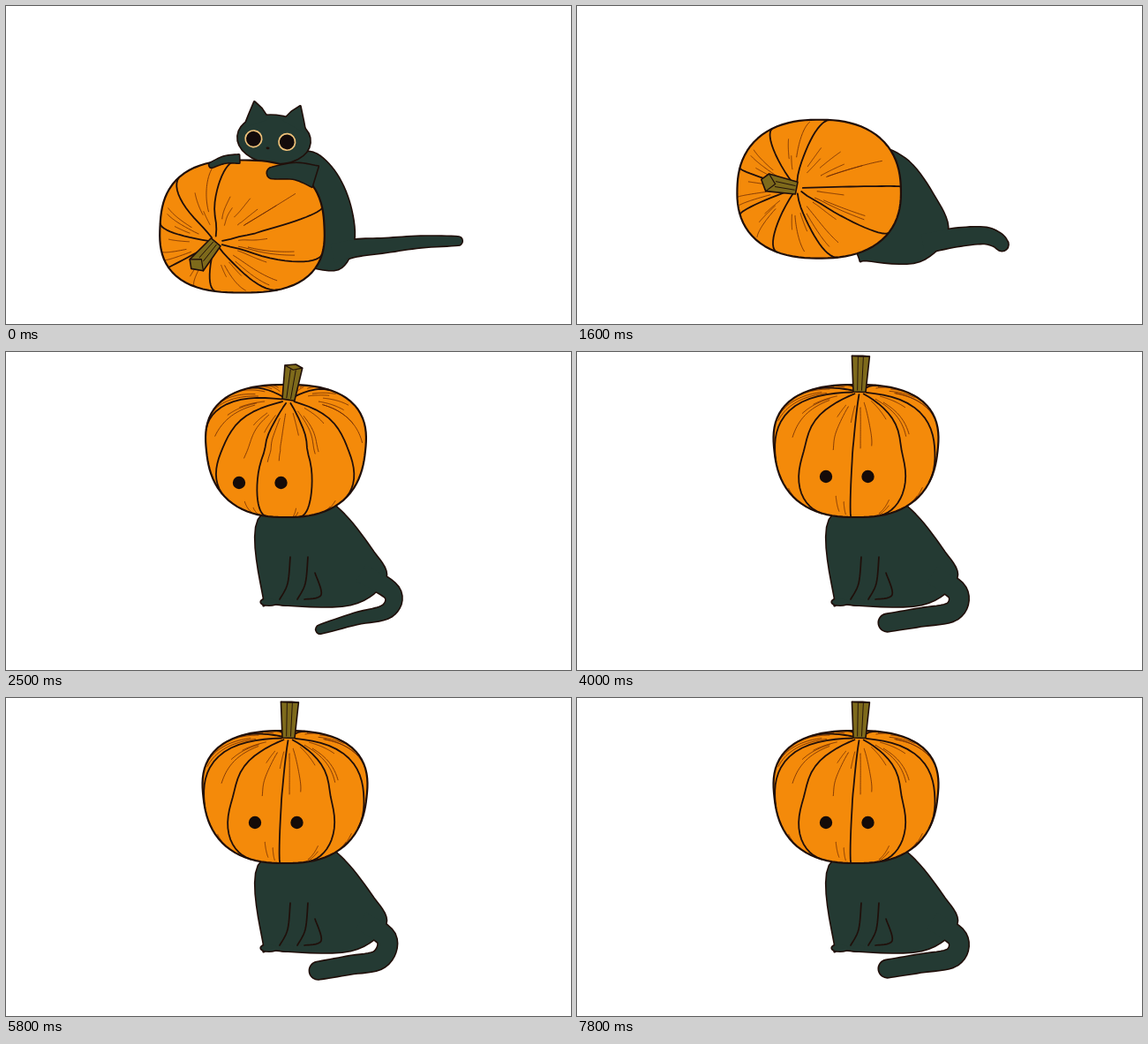
Write an HTML page with a canvas that moves like this. It is 640 px wide and 360 px high and loops after 7900 ms.

```html
<!DOCTYPE html>
<html lang="en">
<head>
<meta charset="utf-8">
<title>Cat and pumpkin</title>
<style>
html, body { margin: 0; width: 100%; height: 100%; overflow: hidden; background: #fff; }
canvas { display: block; width: 640px; height: 360px; }
</style>
</head>
<body>
<canvas id="c" width="640" height="360"></canvas>
<script>
const ctx = document.getElementById('c').getContext('2d');
const LOOP = 7900, STEP = 100, RAD = Math.PI / 180;
const FUR = '#243a33', INK = '#200f0a', SKIN = '#f48a0a', STEM = '#7e6a1b', HATCH = 'rgba(105,40,6,.8)';

// The pumpkin is a ribbed ball: shape = [roundness, taper], axis = where the stem sits on the unit disc.
// The torso runs neck, back, rump, hip, front foot, chest; the tail is its centre line.
const lying = {
  at: [267.5, 249.5], size: [93, 75], shape: [2.6, -.04], axis: [-.295, .22], spin: 25, stem: 130, eyes: [200, 300],
  torso: [340,165, 368,182, 388,220, 394,266, 376,298, 320,290, 300,185],
  tail: [370,280, 396,274, 430,271, 470,267, 512,266], tip: 9
};
const hugged = {
  ...lying, at: [273, 251.5], size: [92, 74], axis: [-.31, .2], spin: 28, stem: 127,
  torso: [325,160, 368,174, 403,212, 415,255, 390,290, 330,285, 300,185],
  tail: [380,275, 415,263, 445,249, 475,240, 506,241], tip: 14
};
const lifted = {
  at: [275.5, 156.5], size: [93.5, 83.5], shape: [2.1, 0], axis: [-.235, -.255], spin: -6, stem: 264, eyes: [240, 221],
  torso: [340,165, 375,171, 402,212, 425,255, 385,288, 305,289, 288,235],
  tail: [405,262, 445,261, 477,272, 475,292, 453,303], tip: 14
};
const sitting = {
  at: [316, 112], size: [92.5, 75], shape: [2.5, .09], axis: [.04, -.89], spin: -5, stem: 272, eyes: [282, 141],
  torso: [350,165, 379,180, 413,222, 430,256, 390,286, 292,284, 286,190],
  tail: [402,252, 431,272, 424,295, 388,302, 353,308], tip: 19
};
const turning = {
  ...sitting, at: [317, 112], size: [90, 75], axis: [.03, -.77], spin: -22, stem: 279, eyes: [264, 148],
  tail: [402,250, 437,272, 432,293, 396,302, 356,314], tip: 9
};
const keys = [[0, lying], [850, lying], [1100, hugged], [1250, hugged], [2000, lifted], [2500, turning], [2900, sitting], [LOOP, sitting]];

const clamp = v => Math.max(0, Math.min(1, v));
const mix = (a, b, k) => Array.isArray(a) ? a.map((v, i) => mix(v, b[i], k)) : a + (b - a) * k;
const rnd = i => Math.abs(Math.sin(i * 12.9898) * 43758.5453) % 1;

function poseAt(t) {
  const i = keys.findIndex(([end]) => t < end) - 1;
  const [t0, a] = keys[i], [t1, b] = keys[i + 1], pose = {};
  for (const part in a) pose[part] = mix(a[part], b[part], (t - t0) / (t1 - t0));
  const sway = Math.cos((t - 6050) / 1267 * 2 * Math.PI) * clamp((t - 2500) / 400);
  for (let j = 4; j < 10; j += 2) {
    pose.tail[j] += sway * (j - 6);
    pose.tail[j + 1] += sway * 2;
  }
  return pose;
}

// Flat list of key points to a dense Catmull-Rom polyline.
function smooth(p, closed) {
  const n = p.length / 2, out = [], steps = 8;
  const at = (i, c) => p[2 * (closed ? (i + n) % n : Math.max(0, Math.min(n - 1, i))) + c];
  for (let s = 0; s <= (closed ? n : n - 1) * steps; s++) {
    const i = Math.floor(s / steps), u = s / steps - i;
    out.push([0, 1].map(c => {
      const [a, b, d, e] = [-1, 0, 1, 2].map(j => at(i + j, c));
      return b + u / 2 * (d - a + u * (2 * a - 5 * b + 4 * d - e + u * (3 * (b - d) + e - a)));
    }));
  }
  return out;
}

function poly(points, closed) {
  const path = new Path2D();
  points.forEach(([x, y]) => path.lineTo(x, y));
  if (closed) path.closePath();
  return path;
}

// Tapered limb with a round end.
function tube(p, w0, w1) {
  const mid = smooth(p), left = [], right = [];
  let angle = 0;
  mid.forEach(([x, y], i) => {
    const a = mid[Math.max(0, i - 1)], b = mid[Math.min(mid.length - 1, i + 1)];
    angle = Math.atan2(b[1] - a[1], b[0] - a[0]);
    const r = mix(w0, w1, i / (mid.length - 1)) / 2, nx = -Math.sin(angle) * r, ny = Math.cos(angle) * r;
    left.push([x + nx, y + ny]);
    right.unshift([x - nx, y - ny]);
  });
  const path = poly(left), [x, y] = mid[mid.length - 1];
  path.arc(x, y, w1 / 2, angle + Math.PI / 2, angle - Math.PI / 2, true);
  right.forEach(q => path.lineTo(...q));
  path.closePath();
  return path;
}

function ellipse(x, y, rx, ry = rx) {
  const path = new Path2D();
  path.ellipse(x, y, rx, ry, 0, 0, 2 * Math.PI);
  return path;
}

function line(path, width, color = INK) {
  ctx.lineWidth = width;
  ctx.strokeStyle = color;
  ctx.stroke(path);
}

function fill(path, color) {
  ctx.fillStyle = color;
  ctx.fill(path);
}

// Several shapes merged under one outline.
function merged(shapes) {
  shapes.forEach(s => line(s, 3.2));
  shapes.forEach(s => fill(s, FUR));
}

function placed(x, y, angle, paint) {
  ctx.save();
  ctx.translate(x, y);
  ctx.rotate(angle * RAD);
  paint();
  ctx.restore();
}

function drawPumpkin({ at, size, shape: [n, taper], axis: [ax, ay], spin, stem, eyes }, t) {
  const az = Math.sqrt(1 - ax * ax - ay * ay), q = 1 / (1 + az);

  // Unit disc to the rounded box of the silhouette.
  const place = (x, y) => {
    const r = Math.hypot(x, y) || 1;
    const f = (Math.abs(x / r) ** n + Math.abs(y / r) ** n) ** (-1 / n);
    return [at[0] + x * f * size[0] * (1 - taper * y), at[1] + y * f * size[1]];
  };

  // Visible part of a meridian between two polar angles.
  const meridian = (deg, from, to) => {
    const s = Math.sin(deg * RAD), c = Math.cos(deg * RAD), points = [];
    const dx = s * (1 - ax * ax * q) - c * ax * ay * q, dy = c * (1 - ay * ay * q) - s * ax * ay * q, dz = -s * ax - c * ay;
    for (let i = 0; i <= 30; i++) {
      const a = mix(from, to, i / 30), u = Math.cos(a), v = Math.sin(a);
      if (u * az + v * dz < 0) break;
      points.push(place(u * ax + v * dx, u * ay + v * dy));
    }
    return poly(points);
  };

  const rim = [];
  for (let d = 0; d < 360; d += 4) rim.push(place(Math.cos(d * RAD), Math.sin(d * RAD)));
  const skin = poly(rim, true);
  fill(skin, SKIN);

  for (let i = 0; i < 45; i++) {
    const deg = spin + 40 * (i % 9 + .12 + .76 * rnd(i + 1)), low = i > 26;
    const from = low ? 1.6 + .5 * rnd(i + 60) : .25 + .2 * rnd(i + 60);
    line(meridian(deg, from, from + (low ? .4 : .2 + .65 * rnd(i + 120))), 1, HATCH);
  }
  for (let k = -5; k <= 2; k++) line(meridian(spin + 40 * k, .08, 3), 1.8);
  line(skin, 2.2);

  placed(...place(ax, ay), stem, () => {
    const d = (az - .42) * 17, end = 41 - .8 * d;
    const shape = poly([[0, -7], [0, 7], [end, 10], [end + .8 * d, 2], [end, -10]], true);
    fill(shape, STEM);
    line(shape, 1.6);
    line(poly([[end, -10], [end - d, 0], [end, 10]]), 1.2);
    for (const y of [-3, 3]) line(poly([[end - d, y], [2, y * .8]]), .9);
  });

  if (t >= 1800)
    for (const gap of [0, 47.5]) fill(ellipse(eyes[0] + gap, eyes[1], t < 2500 ? 6.3 : 7.2), '#150b08');
}

function drawHead(t) {
  if (t >= 1600) return;
  const duck = clamp((t - 850) / 250), dive = clamp((t - 1100) / 400);
  placed(303.5, 151 + 28 * duck + 40 * dive, 5.5 - 6.5 * duck, () => {
    const ears = [-1, 1].map(s => poly([[s * 35, -10], [s * 31, -24], [s * 26, -40], [s * 17, -33], [s * 8, -22]], true));
    merged([ellipse(0, 0, 41, 27), ...ears]);
    if (t >= 1000) return;
    for (const x of [-23, 15]) {
      if (t === 100 || t === 600) line(poly(smooth([x - 9, 0, x, 4, x + 9, 0])), 1.6, '#e9bd78');
      else {
        fill(ellipse(x, 1.5, 9.3), '#130b0b');
        line(ellipse(x, 1.5, 9.3), 1.7, '#efc27a');
      }
    }
    fill(ellipse(-6, 10.5, 2, 1.4), INK);
  });
}

function drawCat({ torso, tail, tip }, t) {
  const [fx, fy] = torso.slice(10), sits = t >= 1800;
  const body = poly(smooth([...torso.slice(0, 10), fx + 10, fy + 1, fx, fy - 6, ...torso.slice(12)], true), true);
  const paws = sits ? [6, 25, 46].map(x => ellipse(fx + x, fy - 1, 9, 3.5)) : [];
  merged([body, tube(tail, 22, tip), ...paws]);
  if (sits) {
    for (const x of [30, 50]) line(poly(smooth([fx + x, fy - 52, fx + x - 3, fy - 22, fx + x - 12, fy - 4])), 1.7);
    line(poly(smooth([fx + 58, fy - 34, fx + 65, fy - 9, fx + 46, fy - 4])), 1.7);
  }
  drawHead(t);
  if (t >= 1600 && t < 2300) {
    const x = Math.max(0, t - 2000) / 8;
    merged([tube([278 + x, 230, 255 + x, 246 - x], 17, 11)]);
  }
}

function drawPaws(t) {
  if (t >= 1500) return;
  const k = clamp((t - 850) / 250), up = Math.max(0, t - 1250) * .08;
  ctx.save();
  ctx.translate(0, -up);
  merged([tube(mix([264,173, 248,174, 233,180], [268,174, 260,174, 253,175], k), 9, mix(5, 9, k))]);
  merged([tube(mix([350,193, 328,187, 302,189], [362,200, 347,197, 336,200], k), 24, mix(12, 16, k))]);
  ctx.restore();
}

function draw(t) {
  ctx.fillStyle = '#fff';
  ctx.fillRect(0, 0, 640, 360);
  const pose = poseAt(t);
  drawCat(pose, t);
  drawPumpkin(pose, t);
  drawPaws(t);
}

ctx.lineJoin = ctx.lineCap = 'round';
const start = performance.now();
function tick() {
  const t = (performance.now() - start) % LOOP;
  draw(Math.floor(t / STEP) * STEP);
  requestAnimationFrame(tick);
}
tick();
</script>
</body>
</html>
```
